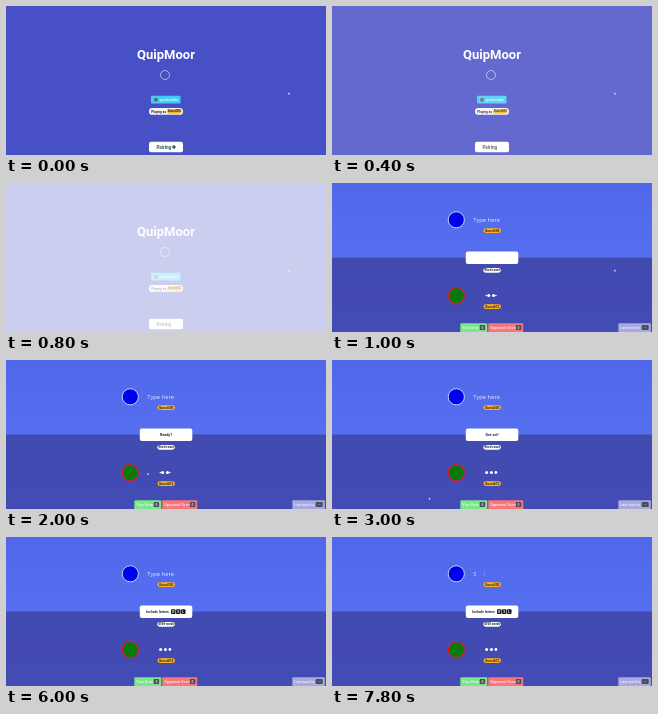
Animation of 320 by 149 pixels, one loop 8 s. Source, as an HTML page with a canvas:

```html
<!DOCTYPE html>
<html lang="en">
<head>
<meta charset="utf-8">
<style>
html, body { margin: 0; width: 100%; height: 100%; overflow: hidden; background: #fff; }
canvas { display: block; width: 100vw; height: 100vh; }
</style>
</head>
<body>
<canvas id="stage"></canvas>
<script>
const W = 320, H = 149, LOOP = 8000;
const canvas = document.getElementById('stage');
const ctx = canvas.getContext('2d');

function box(x, y, w, h, radius, color) {
  ctx.fillStyle = color;
  ctx.beginPath();
  ctx.roundRect(x, y, w, h, radius);
  ctx.fill();
}

function circle(x, y, r, fill, stroke, width = 1) {
  ctx.beginPath();
  ctx.arc(x, y, r, 0, Math.PI * 2);
  if (fill) { ctx.fillStyle = fill; ctx.fill(); }
  if (stroke) { ctx.strokeStyle = stroke; ctx.lineWidth = width; ctx.stroke(); }
}

function text(str, x, y, size, color, align = 'center', weight = 700, family = 'Roboto') {
  ctx.font = `${weight} ${size}px ${family}, sans-serif`;
  ctx.textAlign = align;
  ctx.fillStyle = color;
  ctx.fillText(str, x, y);
}

function pill(str, x, y, w, h, color, size = 3.3) {
  box(x, y, w, h, h / 2, color);
  text(str, x + w / 2, y + h / 2 + size * .35, size, '#222');
}

function pointer(x, y) {
  ctx.fillStyle = '#fff';
  ctx.beginPath();
  ctx.moveTo(x - .7, y - 1);
  ctx.lineTo(x + 1.1, y + .6);
  ctx.lineTo(x - .6, y + 1.3);
  ctx.fill();
}

function drawLobby(t) {
  const fade = Math.min(1, Math.max(0, (t - 300) / 700));
  box(0, 0, W, H, 0, '#4850c5');
  text('QuipMoor', 160, 53, 13, '#fff');
  circle(159, 69, 4.5, null, '#d5d8f5', .7);

  box(145, 89.8, 29.5, 7.7, 1, '#3fcdf6');
  circle(150, 93.7, 2, '#75605c');
  text('quickscribe', 153.5, 95, 3.6, '#d8f6ff', 'left');

  box(143, 102, 34, 6.8, 3.4, '#f4f4fa');
  text('Playing as', 145.3, 106.6, 3.2, '#222', 'left');
  pill('Guest305', 161, 103, 14.7, 4.8, '#ffb515', 3);

  box(143, 135.8, 34, 10.5, 2, '#fff');
  text('Pairing', 150.4, 142.7, 4.6, t < 400 ? '#28604a' : '#555', 'left');
  if (t < 400) {
    ctx.fillStyle = '#176b3d';
    ctx.beginPath();
    ctx.moveTo(165.8, 141);
    ctx.lineTo(168, 139);
    ctx.lineTo(170, 141);
    ctx.lineTo(168, 143);
    ctx.fill();
  }
  pointer(283, 87.5);
  box(0, 0, W, H, 0, `rgba(255,255,255,${fade})`);
}

// Four dots: one grows in, two slide right, one shrinks away.
function drawWaiting(t) {
  const phase = t % 600 / 600;
  const u = .5 - Math.sin(Math.asin(1 - 2 * phase) / 3);
  const k = 3 * u * (1 - u) ** 2 + u ** 3;
  const r = 1.5;
  circle(154.3, 112.5, r * k, '#fff');
  circle(154.3 + 4.8 * k, 112.5, r, '#fff');
  circle(159.1 + 4.8 * k, 112.5, r, '#fff');
  circle(163.9, 112.5, r * (1 - k), '#fff');
}

function scoreTab(label, x, w, color, value, badgeX, badgeW) {
  box(x, 140.3, w, 8.7, [1, 1, 0, 0], color);
  text(label, x + 2, 145.9, 3.7, 'rgba(255,255,255,.85)', 'left', 500);
  box(badgeX, 141.9, badgeW, 5, 1, '#484b59');
  text(value, badgeX + badgeW / 2, 145.6, 3.4, '#ddd');
}

function drawPrompt(t) {
  box(133.8, 68.4, 52.5, 12.6, 2, '#fff');
  if (t >= 5100) {
    text('Include letters', 140.3, 76, 3.5, '#222', 'left');
    [...'RSL'].forEach((letter, i) => {
      const x = 165 + i * 5;
      box(x, 72.3, 4.5, 4.8, 1, '#151515');
      text(letter, x + 2.25, 76, 3.4, '#fff');
    });
  } else if (t >= 1400) {
    const label = t < 2600 ? 'Ready?' : t < 3900 ? 'Get set!' : 'GO!';
    text(label, 160, 76, 3.7, '#222');
  }
  pill(t < 5100 ? 'Word count' : '4768 words', 151.3, 85, 17.5, 4.7, '#fff', 3);
}

const path = [[1300, 283, 87.5], [2400, 82, 125], [3000, 97.5, 138.5], [3500, 62, 152]];

function drawPointer(t) {
  if (t >= 3500) return;
  if (t < 1300) return pointer(283, 87.5);
  const i = path.findIndex(p => p[0] > t);
  const [a, b] = [path[i - 1], path[i]];
  const p = (t - a[0]) / (b[0] - a[0]);
  const k = p * p * (3 - 2 * p);
  pointer(a[1] + (b[1] - a[1]) * k, a[2] + (b[2] - a[2]) * k);
}

function shade(y, h, top, bottom) {
  const g = ctx.createLinearGradient(0, y, 0, y + h);
  g.addColorStop(0, top);
  g.addColorStop(1, bottom);
  ctx.fillStyle = g;
  ctx.fillRect(0, y, W, h);
}

function drawGame(t) {
  shade(0, 74.6, '#5067e9', '#566ff1');
  shade(74.6, H - 74.6, '#424bb0', '#434bb5');

  circle(124.3, 36.8, 8.1, '#0000ee', '#b5dcf0', 1);
  circle(124.3, 112.8, 8.1, '#087a0b', '#d51f35', 1.3);

  if (t < 7400) {
    text('Type here', 141.3, 39.3, 5.8, '#e5eaff', 'left', 400, '"Open Sans"');
  } else {
    text('s', 141.3, 39.3, 6.5, '#d5dfff', 'left', 400, '"Open Sans"');
    box(152, 34.5, .5, 4.5, 0, 'rgba(215,225,255,.45)');
  }
  pill('Guest305', 151.5, 45.2, 17.5, 4.7, '#ffb020');
  pill('Guest412', 151.5, 121.2, 17.5, 4.7, '#ffb020');

  drawWaiting(t);
  drawPrompt(t);
  scoreTab('Your Score', 128.3, 27, '#7ce58b', '0', 147.6, 5.5);
  scoreTab('Opponent Score', 156.2, 35, '#f5777c', '0', 183.8, 5.5);
  scoreTab('Last word is', 286.3, 32.5, '#a7a9df', '--', 309.7, 7);
  drawPointer(t);
}

function draw(now) {
  const ratio = devicePixelRatio || 1;
  const w = Math.round(innerWidth * ratio), h = Math.round(innerHeight * ratio);
  if (canvas.width !== w || canvas.height !== h) {
    canvas.width = w;
    canvas.height = h;
  }
  ctx.setTransform(w / W, 0, 0, h / H, 0, 0);
  const t = now % LOOP;
  if (t < 900) drawLobby(t); else drawGame(t);
  requestAnimationFrame(draw);
}
requestAnimationFrame(draw);
</script>
</body>
</html>
```
